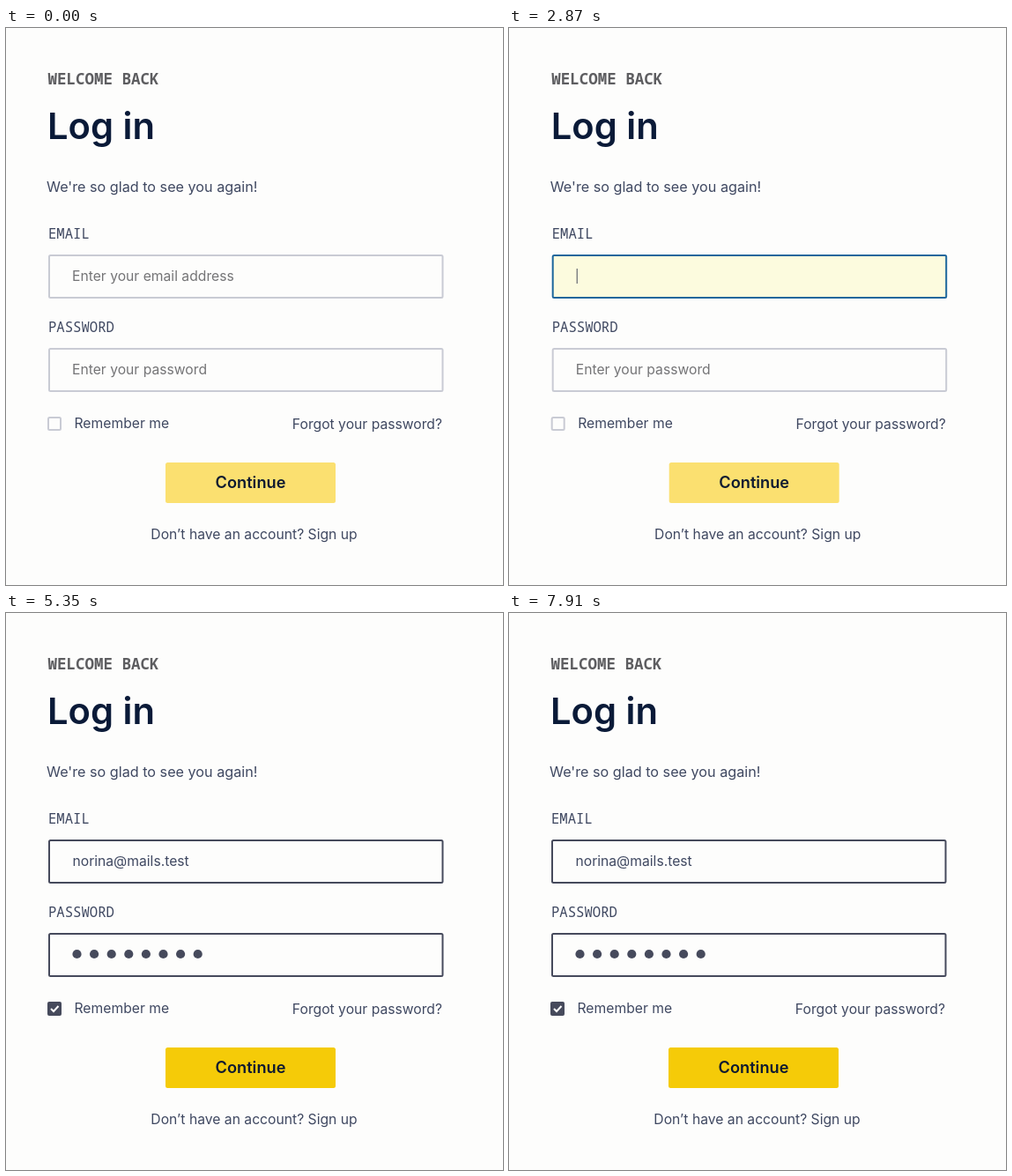
An HTML page for the animation above (8000 ms loop, 564 px wide and 632 px high).

```html
<!DOCTYPE html>
<html lang="en">
<head>
<meta charset="utf-8">
<title>Log in</title>
<style>
  html, body { margin: 0; width: 100%; height: 100%; overflow: hidden; background: #fdfdfc; }
  svg { display: block; width: 564px; height: 632px; }
  text { font: 400 15.7px Inter, Roboto, sans-serif; fill: #3f4861; }
  text.mono { font: 400 15.6px "Noto Sans Mono", "DejaVu Sans Mono", monospace; }
  text.eyebrow { font-weight: 600; font-size: 17.5px; fill: #5d5d60; }
  text.title { font-weight: 600; font-size: 41.7px; fill: #0a1a38; }
  text.intro { font-size: 16.2px; }
  text.hint { fill: #747476; }
  text.button { font-weight: 600; font-size: 18.2px; fill: #0e1a30; }
</style>
</head>
<body>
<svg id="stage" viewBox="0 0 564 632"></svg>
<script>
const LOOP = 8000, FADE = 300;
const PAPER = '#fdfdfc', SLATE = '#464a5c', PALE = '#c9cbd4', BLUE = '#1d679c';

const label = (x, y, content, cls = '', anchor = 'start') =>
  `<text x="${x}" y="${y}" class="${cls}" text-anchor="${anchor}">${content}</text>`;

const field = (y, stroke, fill, content) =>
  `<rect x="49" y="${y + 1}" width="446.5" height="48" rx="1.5" fill="${fill}" stroke="${stroke}" stroke-width="2"/>${content}`;

const checkbox = checked => checked
  ? `<rect x="47" y="441" width="16" height="16" rx="2" fill="${SLATE}"/>
     <path d="M51 449l3 3 5.5-6" fill="none" stroke="#fff" stroke-width="2"/>`
  : `<rect x="48" y="442" width="14" height="14" rx="1.5" fill="none" stroke="${PALE}" stroke-width="2"/>`;

const screen = ({ shift = 0, email, password, checked, button }) => `
  <g>
    <rect width="564" height="632" fill="${PAPER}"/>
    <g transform="translate(${shift})">
      ${label(47.5, 64, 'WELCOME BACK', 'mono eyebrow')}
      ${label(47, 126, 'Log in', 'title')}
      ${label(46, 186, "We're so glad to see you again!", 'intro')}
      ${label(48, 239, 'EMAIL', 'mono')}
      ${field(257, ...email)}
      ${label(48, 345, 'PASSWORD', 'mono')}
      ${field(363, ...password)}
      ${checkbox(checked)}
      ${label(77.5, 454, 'Remember me')}
      ${label(495, 455, 'Forgot your password?', '', 'end')}
      <rect x="181" y="493" width="193" height="46" rx="2.5" fill="${button}"/>
      ${label(277.5, 522, 'Continue', 'button', 'middle')}
      ${label(281.5, 580, 'Don’t have an account? Sign up', '', 'middle')}
    </g>
  </g>`;

const dots = Array.from({ length: 8 }, (_, i) =>
  `<circle cx="${80.5 + 19.6 * i}" cy="387" r="5.1" fill="${SLATE}"/>`).join('');
const caret = `<rect x="76" y="273" width="1" height="17" fill="${SLATE}"/>`;
const emptyPassword = [PALE, 'none', label(75, 393, 'Enter your password', 'hint')];

const screens = [
  { start: -FADE, email: [PALE, 'none', label(75, 287, 'Enter your email address', 'hint')],
    password: emptyPassword, button: '#fbe070' },
  { start: 2010, shift: 0.7, email: [BLUE, '#fcfbde', caret],
    password: emptyPassword, button: '#fbe070' },
  { start: 4960, email: [SLATE, 'none', label(75.5, 287, 'norina@mails.test')],
    password: [SLATE, 'none', dots], checked: true, button: '#f5cb08' },
];

const stage = document.getElementById('stage');
stage.innerHTML = screens.map(screen).join('');

// Each screen dissolves in over the one below it.
function draw() {
  const time = performance.now() % LOOP;
  screens.forEach(({ start }, i) => {
    const p = Math.min(1, Math.max(0, (time - start) / FADE));
    stage.children[i].setAttribute('opacity', 1 - (1 - p) ** 2);
  });
  requestAnimationFrame(draw);
}
draw();
</script>
</body>
</html>
```
